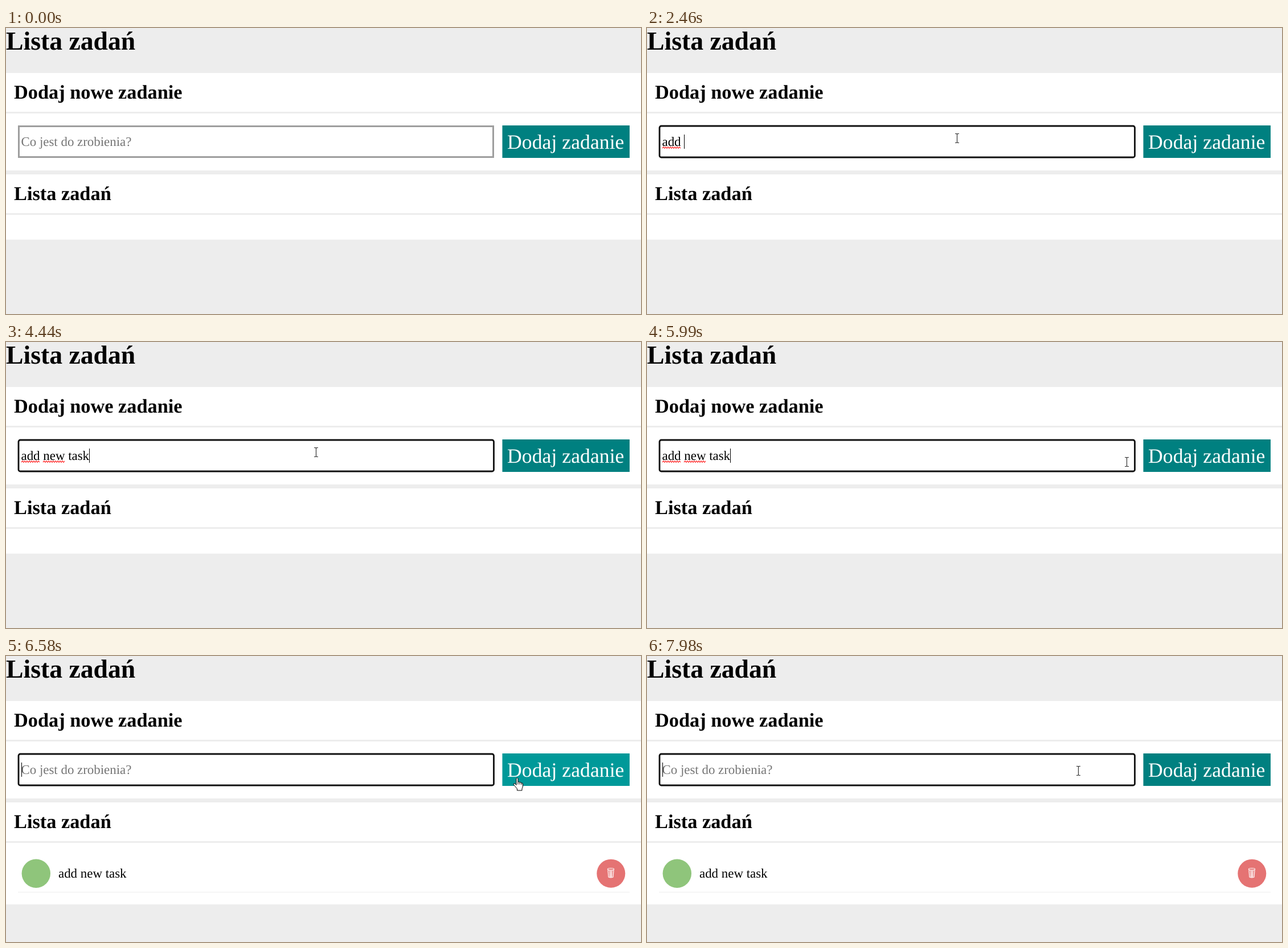
An HTML page for the animation above (8 s loop, 1115 px wide and 502 px high).

```html
<!DOCTYPE html>
<html lang="pl">
<head>
<meta charset="utf-8">
<title>Lista zadań</title>
<style>
  html, body { margin: 0; width: 100%; height: 100%; overflow: hidden; background: #ededed; }
  svg { display: block; width: 100%; height: 100%; }
  text {
    font-family: "Liberation Serif", "Times New Roman", serif;
    text-rendering: geometricPrecision;
    white-space: pre;
  }
  .h1 { font-size: 45.7px; font-weight: bold; }
  .h2 { font-size: 34.35px; font-weight: bold; }
  .body { font-size: 22.9px; }
  .button { font-size: 35.75px; fill: #fff; }
  .squiggle { fill: none; stroke: #f33; stroke-width: 1.3; }
</style>
</head>
<body>
<svg viewBox="0 0 1115 502">
  <rect width="1115" height="502" fill="#ededed"/>
  <text class="h1" x="0" y="38">Lista zadań</text>

  <rect y="79" width="1115" height="171" fill="#fff"/>
  <rect y="147" width="1115" height="3" fill="#ededed"/>
  <text class="h2" x="14" y="124">Dodaj nowe zadanie</text>

  <rect id="border" x="22.5" y="172.5" width="833" height="54" fill="#fff" stroke="#9e9e9e" stroke-width="3"/>
  <rect id="ring" x="22" y="172" width="834.5" height="55" rx="3" fill="#fff" stroke="#101010" stroke-width="2.8"/>
  <text id="hint" class="body" x="26.5" y="207" fill="#757575">Co jest do zrobienia?</text>
  <text id="typed" class="body" x="26.5" y="207"></text>
  <path id="wave1" class="squiggle"/>
  <path id="wave2" class="squiggle"/>
  <rect id="caret" y="187" width="1" height="25"/>

  <rect id="button" x="871.5" y="171" width="223.5" height="57"/>
  <text class="button" x="880" y="212">Dodaj zadanie</text>

  <rect id="list" y="257" width="1115" fill="#fff"/>
  <rect y="325" width="1115" height="3" fill="#ededed"/>
  <text class="h2" x="14" y="301.5">Lista zadań</text>

  <g id="item">
    <rect x="21" y="414" width="1074" height="1" fill="#eee"/>
    <circle cx="52.8" cy="381.7" r="25.2" fill="#8fc57b"/>
    <text class="body" x="92" y="388.5">add new task</text>
    <circle cx="1062.3" cy="381.7" r="25" fill="#e57373"/>
    <g fill="none" stroke="#fff" stroke-width="1.2">
      <ellipse cx="1062" cy="374.2" rx="5.6" ry="1.7"/>
      <path d="M1057 376 l1 12 q4 2 8 0 l1 -12 M1060 377 l.4 11 M1062 377 v12 M1064 377 l-.4 11"/>
    </g>
  </g>

  <circle id="glow" r="11.5" fill="#ff0" fill-opacity=".52"/>
  <g id="beam" fill="none">
    <path d="M-3.5 -8 H-1 L0 -7 L1 -8 H3.5 M0 -7 V7 M-3.5 8 H-1 L0 7 L1 8 H3.5" stroke="#333" stroke-width="1.2"/>
  </g>
  <path id="arrow" d="M0 0 V16.5 L3.8 13 L6.3 18.8 L8.8 17.7 L6.3 12 H11.7 Z" fill="#fff" stroke="#000"/>
  <path id="hand" fill="#fff" stroke="#000" stroke-linejoin="round"
    d="M-1.5 1.5 Q0 -1 1.5 1.5 V8 Q3.4 6 4.6 8.6 Q6.6 7 7.6 9.6 Q10 8.6 10 11.5 V15.5 L8.5 19.5 V22.5 H0 V19.5 L-4 14.8 L-6.5 11.8 Q-6 9 -3.5 10.8 L-1.5 13 Z M1.5 8 V12 M4.6 8.6 V12 M7.6 9.6 V12.5"/>
</svg>
<script>
const LOOP = 8000, BLINK = 530, TEXT_X = 26.5;
const TASK = "add new task";
const KEYS = [1400, 2190, 2330, 2460, 2920, 3050, 3170, 3380, 4040, 4110, 4310, 4440];
const FOCUS = 950, PRESS = 6520, ADDED = 6580, FLASH = 60;

const MOVES = [
  { at: 180, every: 70, steps: 11, from: [890, 525], to: [544, 193], ease: p => 1 - (1 - p) ** 2 },
  { at: 5430, every: 69, steps: 12, from: [544, 193], to: [897, 213], ease: p => p * p * (3 - 2 * p) },
  { at: 7770, every: 70, steps: 4, from: [897, 213], to: [757, 201], ease: p => p ** 1.4 }
];

const ui = {};
document.querySelectorAll("[id]").forEach(el => ui[el.id] = el);

const show = (el, on) => el.setAttribute("visibility", on ? "visible" : "hidden");
const place = (el, x, y) => el.setAttribute("transform", `translate(${x} ${y})`);

function measure(text) {
  ui.typed.textContent = text;
  return text ? ui.typed.getComputedTextLength() : 0;
}

function wave(from, to) {
  let d = `M${from} 211`;
  for (let x = from + 2, up = true; x <= to; x += 2, up = !up) d += `L${x} ${up ? 208.8 : 211.2}`;
  return d;
}

function pointer(t) {
  const move = MOVES.filter(m => t >= m.at).pop();
  if (!move) return null;
  const step = Math.min(move.steps, Math.floor((t - move.at) / move.every) + 1);
  const p = move.ease(step / move.steps);
  return move.from.map((a, i) => Math.round(a + (move.to[i] - a) * p));
}

function drawPointer(t) {
  const pos = pointer(t);
  const [x, y] = pos || [0, 0];
  const inRow = pos && y >= 171 && y < 228;
  const onInput = inRow && x >= 21 && x < 857;
  const onButton = inRow && x >= 871 && x < 1095;
  show(ui.beam, onInput);
  show(ui.hand, onButton);
  show(ui.arrow, pos && !onInput && !onButton);
  [ui.beam, ui.hand, ui.arrow].forEach(el => place(el, x + .5, y + .5));
  ui.button.setAttribute("fill", onButton ? "#009999" : "#008080");
  show(ui.glow, [FOCUS, PRESS].some(c => t >= c && t < c + FLASH));
  place(ui.glow, x - 1.5, y - .8);
}

function drawInput(t) {
  const focused = t >= FOCUS && t < PRESS || t >= ADDED;
  const count = t < ADDED ? KEYS.filter(k => t >= k).length : 0;
  const width = measure(TASK.slice(0, count));
  const last = [FOCUS, ...KEYS, ADDED].filter(k => t >= k).pop();
  show(ui.border, !focused);
  show(ui.ring, focused);
  show(ui.hint, count === 0);
  show(ui.caret, focused && Math.floor((t - last) / BLINK) % 2 === 0);
  ui.caret.setAttribute("x", Math.max(27, Math.floor(TEXT_X + width)));
  show(ui.wave1, focused && count >= 4);
  show(ui.wave2, focused && count >= 8);
}

function drawList(t) {
  const added = t >= ADDED;
  show(ui.item, added);
  ui.list.setAttribute("height", added ? 179 : 114.5);
}

function render(t) {
  drawInput(t);
  drawList(t);
  drawPointer(t);
}

ui.wave1.setAttribute("d", wave(27, 60));
ui.wave2.setAttribute("d", wave(65, 103));

const start = performance.now();
function tick() {
  render((performance.now() - start) % LOOP);
  requestAnimationFrame(tick);
}
tick();
</script>
</body>
</html>
```
